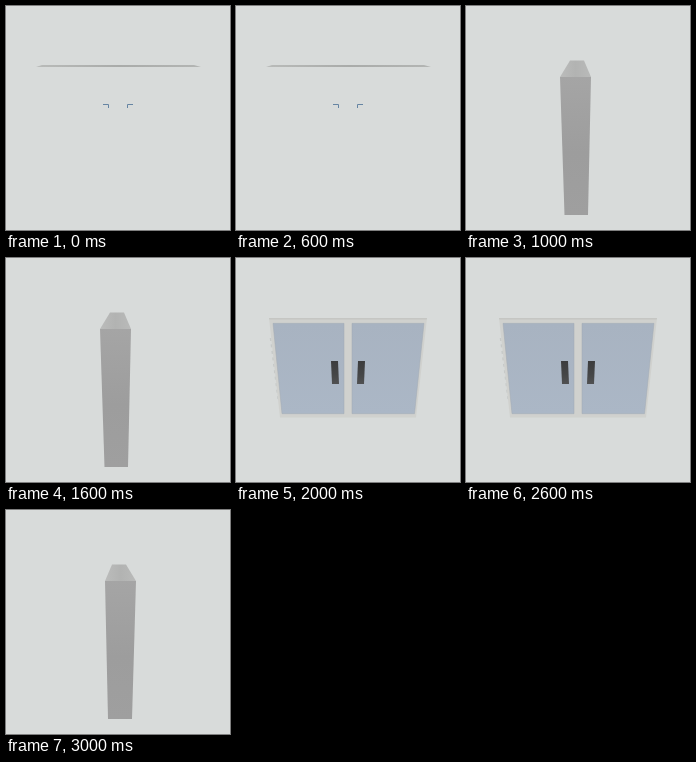
Write an HTML page that moves like this. It is 224x224 px and loops after 4 s.

```html
<!DOCTYPE html>
<html lang="en">
<head>
<meta charset="utf-8">
<title>Turning cabinet</title>
<style>
  html, body { margin: 0; width: 100%; height: 100%; overflow: hidden; background: #d8dbda; }
  svg { display: block; width: 100vw; height: 100vh; }
  .view { visibility: hidden; animation: show 4s step-end infinite; }
  .back { animation-delay: 0s; }
  .left { animation-delay: -3s; }
  .front { animation-delay: -2s; }
  .right { animation-delay: -1s; }
  @keyframes show {
    0% { visibility: visible; }
    25%, 100% { visibility: hidden; }
  }
</style>
</head>
<body>
<svg viewBox="0 0 224 224">
  <defs>
    <linearGradient id="side" x1="0" y1="0" x2="0" y2="1">
      <stop offset="0" stop-color="#a5a5a5"/>
      <stop offset=".55" stop-color="#9d9d9d"/>
      <stop offset="1" stop-color="#9f9f9f"/>
    </linearGradient>
    <linearGradient id="lid">
      <stop offset="0" stop-color="#bbbcbb"/>
      <stop offset=".5" stop-color="#b2b3b2"/>
      <stop offset="1" stop-color="#b9bab9"/>
    </linearGradient>
    <linearGradient id="edge">
      <stop offset="0" stop-color="#b9bbb9"/>
      <stop offset=".5" stop-color="#a9aba9"/>
      <stop offset="1" stop-color="#b3b5b3"/>
    </linearGradient>
    <linearGradient id="glass" x1="0" y1="0" x2="0" y2="1">
      <stop offset="0" stop-color="#a8b3c1"/>
      <stop offset="1" stop-color="#abb7c6"/>
    </linearGradient>
    <linearGradient id="grip" x1="0" y1="0" x2="0" y2="1">
      <stop offset="0" stop-color="#3c3d3e"/>
      <stop offset=".6" stop-color="#454647"/>
      <stop offset="1" stop-color="#505152"/>
    </linearGradient>
  </defs>

  <g class="view back">
    <path d="M30 61 36 59H188L195 61Z" fill="url(#edge)"/>
    <path d="M97 98.5H102.5V102M127 98.5H121.5V102" fill="none" stroke="#6685a3"/>
  </g>

  <g class="view left">
    <path d="M104 54.5H118L125 71H94Z" fill="url(#lid)"/>
    <path d="M94 71H125L122 209H98.5Z" fill="url(#side)"/>
  </g>

  <g class="view front">
    <path d="M34.5 80 42.5 144" fill="none" stroke="#c6c9c8" stroke-width="1.5" stroke-dasharray="3 3.5"/>
    <path d="M33 60H191L180 159.5H44Z" fill="#d0d1ce"/>
    <path d="M33 60H191L190.8 61.5H33.2Z" fill="#c5c6c3"/>
    <g fill="url(#glass)" stroke="#a2aab3" stroke-width=".5">
      <path d="M37 65.3H108V155.7H46Z"/>
      <path d="M116 65.3H188L178.5 155.7H116Z"/>
    </g>
    <g fill="url(#grip)">
      <path d="M95 103H102L103 126H96Z"/>
      <path d="M122 103H129L128 126H121Z"/>
    </g>
  </g>

  <g class="view right">
    <path d="M106 54.5H120L130 71H99Z" fill="url(#lid)"/>
    <path d="M99 71H130L126 209H102Z" fill="url(#side)"/>
  </g>
</svg>
</body>
</html>
```
